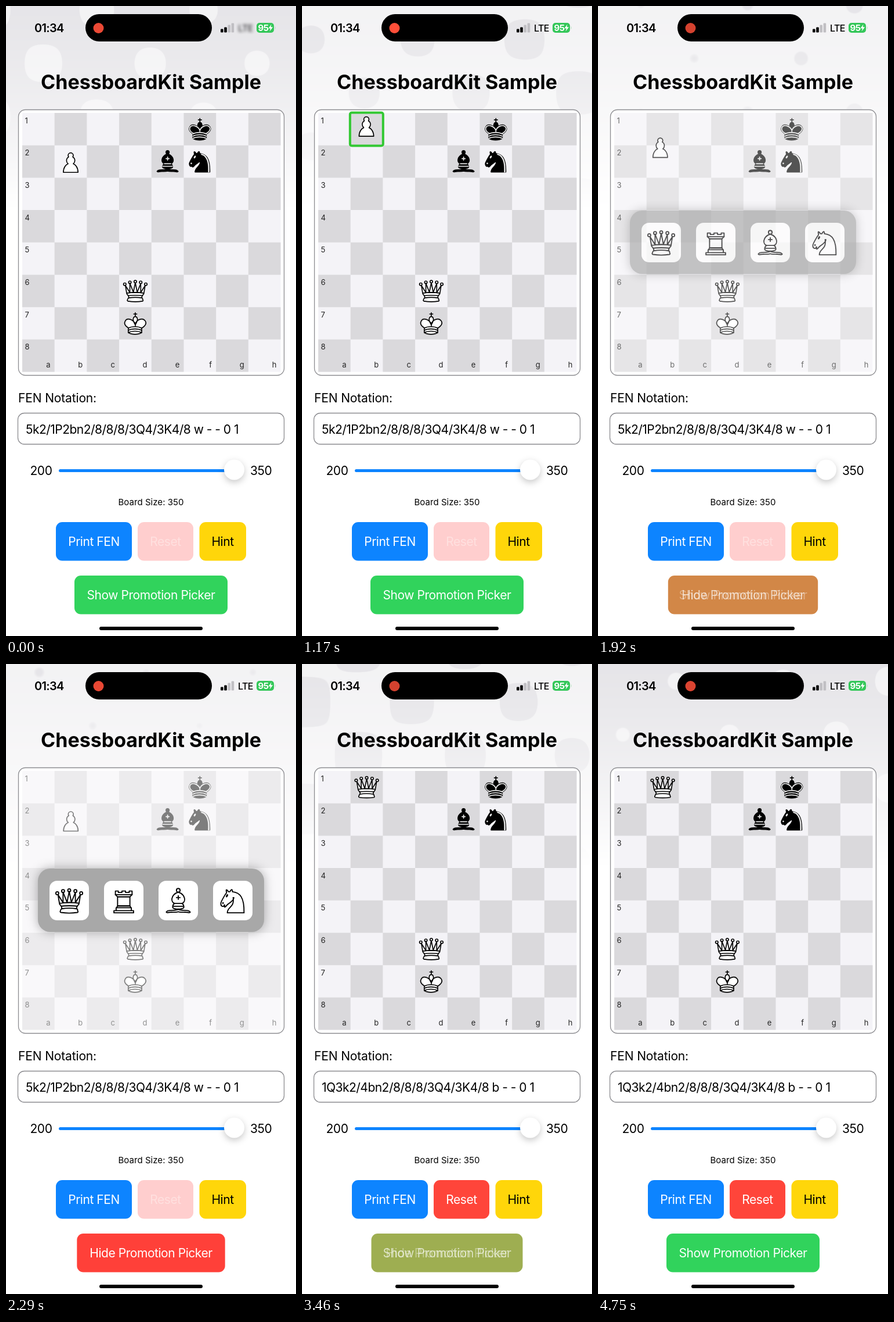
These frames come from a looping animation (500 px wide and 1084 px high, 5230 ms). An HTML page with a canvas:

```html
<!DOCTYPE html>
<html lang="en">
<head>
<meta charset="utf-8">
<title>ChessboardKit Sample</title>
<style>
  html, body { margin: 0; width: 100%; height: 100%; overflow: hidden; background: #fff; }
  canvas, svg { position: absolute; left: 0; top: 0; display: block; }
  text { font: 400 21px Inter, sans-serif; letter-spacing: -.45px; fill: #000; }
  .mid { text-anchor: middle; }
  .end { text-anchor: end; }
  .light { fill: #fff; }
  #title { font-weight: 700; font-size: 34px; letter-spacing: 0; }
  #labels text { font-size: 13px; letter-spacing: 0; fill: #222; }
  #size { font-size: 15px; letter-spacing: .05px; }
  #clock { font-weight: 600; font-size: 20px; letter-spacing: -.7px; }
  #lte { font-weight: 500; font-size: 16px; letter-spacing: -.6px; }
  #charge { font-weight: 700; font-size: 15px; letter-spacing: -.4px; fill: #fff; }
  .frame { fill: #fff; stroke: #8c8c90; stroke-width: 1.3; }
  .piece { stroke: #000; stroke-width: 1.5; stroke-linecap: round; stroke-linejoin: round; }
  #panel { filter: drop-shadow(0 0 9px rgba(0, 0, 0, .3)); }
  #knob { filter: drop-shadow(0 4px 6px rgba(0, 0, 0, .22)); }
</style>
</head>
<body>
<canvas id="backdrop" width="500" height="360"></canvas>
<svg id="stage" width="500" height="1084" viewBox="0 0 500 1084">
  <text id="clock" x="49" y="45">01:34</text>
  <rect x="137" y="14" width="218" height="47" rx="23.5"/>
  <circle id="rec" cx="159.5" cy="38" r="9" fill="#ff4f39"/>
  <g id="signal"></g>
  <text id="lte" x="400" y="43.5">LTE</text>
  <rect x="432" y="29" width="30" height="17" rx="5" fill="#34c759"/>
  <path d="M463.6 34.5q2 3 0 6z" fill="#a9dfb7"/>
  <text id="charge" x="434.5" y="43">95</text>
  <path d="M457.5 31.5l-5 7h3.4l-1.4 5.2 5.6-7.4h-3.6z" fill="#fff"/>

  <text id="title" class="mid" x="250" y="143">ChessboardKit Sample</text>
  <rect class="frame" x="21.5" y="178.5" width="458" height="457" rx="12"/>
  <g id="board">
    <rect x="28" y="184" width="445.5" height="445.5" fill="#f4f3f7"/>
    <path id="dark" fill="#dad9dc"/>
    <g id="labels"></g>
    <g id="pieces"></g>
  </g>
  <rect id="hover" width="57" height="57" rx="3" fill="none" stroke="#32c832" stroke-width="4"/>
  <g id="mover"></g>
  <g id="picker">
    <rect id="panel" x="55" y="352" width="390" height="109" rx="21" fill="#a8a8a8"/>
  </g>

  <text x="21" y="682" style="letter-spacing:-.15px">FEN Notation:</text>
  <rect class="frame" x="20.5" y="700.5" width="459" height="53.5" rx="11"/>
  <text id="fen" x="34" y="735.5" style="letter-spacing:-.52px"></text>

  <text x="41.5" y="807">200</text>
  <text x="421" y="807">350</text>
  <rect x="91" y="797" width="303" height="5" rx="2.5" fill="#0d84ff"/>
  <circle id="knob" cx="393.5" cy="798" r="17.5" fill="#fff"/>
  <text id="size" class="mid" x="250" y="859">Board Size: 350</text>

  <rect x="86" y="888" width="131" height="66.5" rx="11" fill="#0d84ff"/>
  <text class="mid light" x="151.5" y="929">Print FEN</text>
  <rect id="reset" x="227" y="888" width="96" height="66.5" rx="11"/>
  <text id="resetText" class="mid" x="275" y="929">Reset</text>
  <rect x="333.5" y="888" width="80.5" height="66.5" rx="11" fill="#ffd60a"/>
  <text class="mid" x="373.5" y="929">Hint</text>

  <rect id="toggle" y="980" height="66.5" rx="11"/>
  <text id="show" class="mid light" x="250" y="1021">Show Promotion Picker</text>
  <text id="hide" class="mid light" x="250" y="1021">Hide Promotion Picker</text>
  <rect x="161" y="1068" width="178" height="6" rx="3"/>
</svg>
<script>
const LOOP = 5230, CELL = 55.69, LEFT = 28, TOP = 184;
const LIFT = 600, DROP = 1760, PICK = 3305;
const $ = id => document.getElementById(id);
const add = (id, html) => $(id).insertAdjacentHTML('beforeend', html);
const clamp = v => Math.max(0, Math.min(1, v));

// Each piece on a 45 unit square: filled outline, inner lines, solid dots, highlight on black.
const PIECES = {
  p: { body: 'M22.5 9c-2.21 0-4 1.79-4 4 0 .89.29 1.71.78 2.38C17.33 16.5 16 18.59 16 21c0 2.03.94 3.84 2.41 5.03-3 1.06-7.41 5.55-7.41 13.47h23c0-7.92-4.41-12.41-7.41-13.47 1.47-1.19 2.41-3 2.41-5.03 0-2.41-1.33-4.5-3.28-5.62.49-.67.78-1.49.78-2.38 0-2.21-1.79-4-4-4z' },
  q: {
    body: [[6, 12], [14, 9], [22.5, 8], [31, 9], [39, 12]].map(([x, y]) => `M${x - 2} ${y}a2 2 0 1 1 4 0a2 2 0 1 1-4 0z`).join('') +
      'M9 26c8.5-1.5 21-1.5 27 0l2-12-7 11V11l-5.5 13.5-3-15-3 15-5.5-14V25L7 14l2 12z' +
      'M9 26c0 2 1.5 2 2.5 4 1 1.5 1 1 .5 3.5-1.5 1-1.5 2.5-1.5 2.5-1.5 1.5.5 2.5.5 2.5 6.5 1 16.5 1 23 0 0 0 1.5-1 0-2.5 0 0 .5-1.5-1-2.5-.5-2.5-.5-2 .5-3.5 1-2 2.5-2 2.5-4-8.5-1.5-18.5-1.5-27 0z',
    lines: 'M11.5 30c3.5-1 18.5-1 22 0M12 33.5c6-1 15-1 21 0'
  },
  k: {
    body: 'M22.5 11.63V6M20 8h5M22.5 25s4.5-7.5 3-10.5c0 0-1-2.5-3-2.5s-3 2.5-3 2.5c-1.5 3 3 10.5 3 10.5' +
      'M11.5 37c5.5 3.5 15.5 3.5 21 0v-7s9-4.5 6-10.5c-4-6.5-13.5-3.5-16 4V27v-3.5c-3.5-7.5-13-10.5-16-4-3 6 5 10 5 10V37z',
    lines: 'M11.5 30c5.5-3 15.5-3 21 0m-21 3.5c5.5-3 15.5-3 21 0m-21 3.5c5.5-3 15.5-3 21 0',
    inner: 'M32 29.5s8.5-4 6.03-9.65C34.15 14 25 18 22.5 24.5v2.1-2.1C20 18 9.9 14 7 19.85c-2.5 5.65 4.85 9 4.85 9'
  },
  r: {
    body: 'M11 14V9h4v2h5V9h5v2h5V9h4v5l-3 3H14l-3-3M31 17v12.5H14V17M31 29.5l1.5 2.5h-20l1.5-2.5M12 36v-4h21v4H12zM9 39h27v-3H9v3z',
    lines: 'M11 14h23M14 17h17M14 29.5h17'
  },
  b: {
    body: 'M9 36c3.39-.97 10.11.43 13.5-2 3.39 2.43 10.11 1.03 13.5 2 0 0 1.65.54 3 2-.68.97-1.65.99-3 .5-3.39-.97-10.11.46-13.5-1-3.39 1.46-10.11.03-13.5 1-1.35.49-2.32.47-3-.5 1.35-1.94 3-2 3-2z' +
      'M15 32c2.5 2.5 12.5 2.5 15 0 .5-1.5 0-2 0-2 0-2.5-2.5-4-2.5-4 5.5-1.5 6-11.5-5-15.5-11 4-10.5 14-5 15.5 0 0-2.5 1.5-2.5 4 0 0-.5.5 0 2z' +
      'M25 8a2.5 2.5 0 1 1-5 0 2.5 2.5 0 1 1 5 0z',
    lines: 'M17.5 26h10M15 30h15m-7.5-14.5v5M20 18h5'
  },
  n: {
    body: 'M22 10c10.5 1 16.5 8 16 29H15c0-9 10-6.5 8-21' +
      'M24 18c.38 2.91-5.55 7.37-8 9-3 2-2.82 4.34-5 4-1.04-.94 1.41-3.04 0-3-1 0 .19 1.23-1 2-1 0-4 1-4-4 0-2 6-12 6-12s1.89-1.9 2-3.5c-.73-1-.5-2-.5-3 1-1 3 2.5 3 2.5h2s.78-2 2.5-3c1 0 1 3 1 3',
    dots: 'M9.5 25.5a.5.5 0 1 1-1 0 .5.5 0 1 1 1 0zM14.93 15.75a.5 1.5 30 1 1-.86-.5.5 1.5 30 1 1 .86.5z',
    mane: 'M24.55 10.4l-.45 1.45.5.15c3.15 1 5.65 2.49 7.9 6.75S35.75 29.06 35.25 39l-.05.5h2.25l.05-.5c.5-10.06-.88-16.85-3.25-21.34-2.37-4.49-5.79-6.64-9.19-7.16z'
  }
};

function piece(kind, x, y, scale = 1.1, id = '') {
  const white = kind < 'a', p = PIECES[kind.toLowerCase()];
  const ink = white ? '#000' : '#ececec';
  const path = (d, style) => d ? `<path d="${d}" ${style}/>` : '';
  return `<g class="piece" id="${id}" transform="translate(${x} ${y}) scale(${scale}) translate(-22.5 -22.5)">` +
    path(p.body, `fill="${white ? '#fff' : '#000'}"`) +
    path(p.lines, `fill="none" stroke="${ink}"`) +
    path(p.dots, `fill="${ink}" stroke="${ink}"`) +
    (white ? '' : path(p.inner, `fill="none" stroke="${ink}"`) + path(p.mane, `fill="${ink}" stroke="none"`)) + '</g>';
}
const center = (col, row) => [LEFT + CELL * (col + .5), TOP + CELL * (row + .5)];

let dark = '';
for (let i = 0; i < 64; i++) {
  const col = i % 8, row = i >> 3;
  if ((col + row) % 2) dark += `M${LEFT + col * CELL} ${TOP + row * CELL}h${CELL}v${CELL}h${-CELL}z`;
}
$('dark').setAttribute('d', dark);
for (let i = 0; i < 8; i++) {
  add('labels', `<text x="32.5" y="${201.5 + i * CELL}">${i + 1}</text>` +
    `<text class="end" x="${76.5 + i * CELL}" y="622">${'abcdefgh'[i]}</text>`);
}
for (let i = 0; i < 4; i++) {
  const h = [6, 9, 13, 16][i];
  add('signal', `<rect x="${370 + i * 6.2}" y="${45.5 - h}" width="4.6" height="${h}" rx="1.2" fill="${i < 2 ? '#000' : '#c0bfc3'}"/>`);
  const x = 109 + i * 94;
  add('picker', `<rect x="${x - 34}" y="373" width="68" height="68" rx="13" fill="#fff"/>` + piece('QRBN'[i], x, 407.5, 1.25));
}
for (const [kind, col, row] of [['k', 5, 0], ['b', 4, 1], ['n', 5, 1], ['Q', 3, 5], ['K', 3, 6]]) {
  add('pieces', piece(kind, ...center(col, row)));
}
add('pieces', piece('Q', ...center(1, 0), 1.1, 'promoted'));
add('mover', piece('P', 0, 0, 1.1));

// Drifting halftone: a checkered wave cut at a level that sweeps across the header.
const ctx = $('backdrop').getContext('2d');
const W = 500, H = 360, image = ctx.createImageData(W, H);
image.data.fill(255);
function drawBackdrop(s) {
  const k = Math.PI / 92, drift = 43.6 * s, px = image.data;
  const wave = [], level = [];
  for (let x = 0; x < W; x++) {
    wave[x] = Math.cos(k * (x - 65 + drift));
    level[x] = Math.cos(s - 2.22 - .001 * (x - 249));
  }
  for (let y = 0, i = 0; y < H; y++) {
    const wy = Math.cos(k * (y - 6 - drift));
    const fade = 1 - Math.min(1, y / 350) ** 1.3;
    for (let x = 0; x < W; x++, i += 4) {
      const v = (12 + 13 * clamp((wave[x] * wy - level[x]) * 24 + .5)) * fade;
      px[i] = 255 - v;
      px[i + 1] = 255 - v * 1.04;
      px[i + 2] = 255 - v * .9;
    }
  }
  ctx.putImageData(image, 0, 0);
}

function spring(ms) {
  if (ms <= 0) return 0;
  const w = 11.5, z = .72, root = Math.sqrt(1 - z * z), s = ms / 1000, a = w * root * s;
  return 1 - Math.exp(-z * w * s) * (Math.cos(a) + z / root * Math.sin(a));
}

const HOME = center(1, 1);
const DRAG = [[LIFT, ...HOME], [980, 111, 211], [1170, 111, 205.5], [1420, 109, 203], [DROP, 99, 191.5]];
function pawnAt(t) {
  if (t <= LIFT) return HOME;
  const mix = (a, b, p) => a + (b - a) * p;
  if (t >= DROP) {
    const p = spring(t - DROP);
    return [mix(99, HOME[0], p), mix(191.5, HOME[1], p)];
  }
  const i = DRAG.findIndex(k => k[0] > t), a = DRAG[i - 1], b = DRAG[i];
  const u = (t - a[0]) / (b[0] - a[0]), p = u * u * (3 - 2 * u);
  return [mix(a[1], b[1], p), mix(a[2], b[2], p)];
}

const GREEN = [49, 211, 92], RED = [255, 69, 58];
const blend = p => `rgb(${GREEN.map((g, i) => Math.round(Math.sqrt(Math.max(0, g * g + (RED[i] ** 2 - g * g) * p))))})`;
const visible = (id, on) => $(id).setAttribute('visibility', on ? 'visible' : 'hidden');

function draw(t) {
  drawBackdrop(t / 1000);
  const done = t >= PICK, open = t >= DROP && !done;
  const p = done ? 1 - spring(t - PICK) : spring(t - DROP);

  $('rec').style.filter = `brightness(${.915 - .085 * Math.cos((t - 1920) / 1520 * 2 * Math.PI)})`;
  const blur = 1 - clamp(t / 420);
  $('lte').style.filter = blur ? `blur(${2.6 * blur}px)` : 'none';
  $('lte').style.opacity = 1 - .25 * blur;

  const [x, y] = pawnAt(t), dim = open ? 1 - .5 * clamp(p) : 1;
  $('mover').setAttribute('transform', `translate(${x} ${y})`);
  $('mover').style.opacity = $('board').style.opacity = dim;
  visible('mover', !done);
  visible('promoted', done);
  visible('hover', t > LIFT + 20 && t < DROP);
  $('hover').setAttribute('x', 82.8);
  $('hover').setAttribute('y', y < TOP + CELL ? 183.5 : 183.5 + CELL);
  visible('picker', open);
  $('picker').style.opacity = clamp(p);

  $('fen').textContent = done ? '1Q3k2/4bn2/8/8/8/3Q4/3K4/8 b - - 0 1' : '5k2/1P2bn2/8/8/8/3Q4/3K4/8 w - - 0 1';
  $('reset').setAttribute('fill', done ? '#ff453a' : '#ffcece');
  $('resetText').style.fill = done ? '#fff' : '#ffe0df';

  const width = 264 - 8.5 * p;
  $('toggle').setAttribute('x', 250 - width / 2);
  $('toggle').setAttribute('width', width);
  $('toggle').setAttribute('fill', blend(p));
  $('show').style.opacity = clamp(1 - p);
  $('hide').style.opacity = clamp(p);
}

const start = performance.now();
function tick() {
  draw((performance.now() - start) % LOOP);
  requestAnimationFrame(tick);
}
tick();
</script>
</body>
</html>
```
